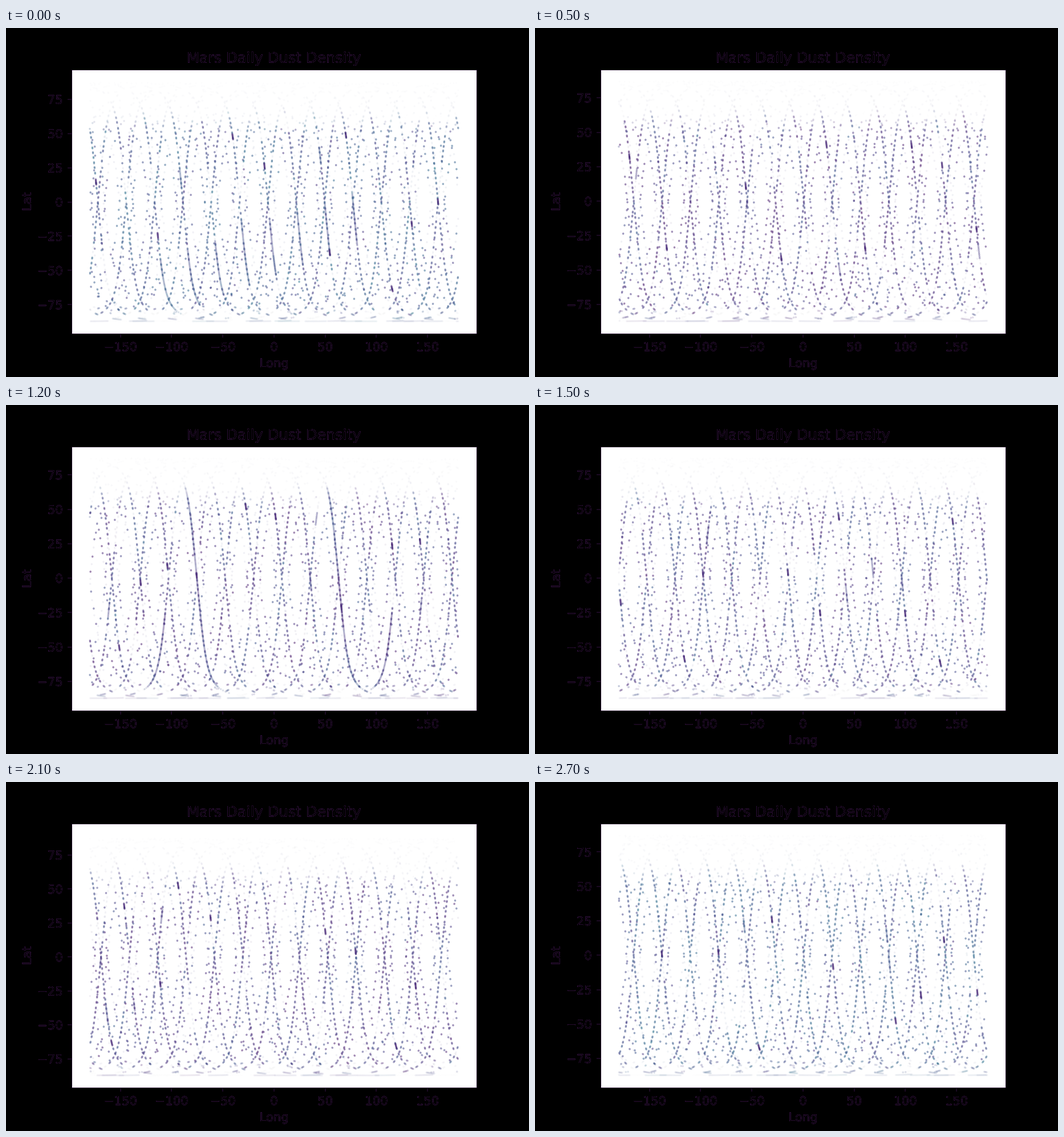
Write a matplotlib script that moves like this. It is 917 px wide and 611 px high and loops after 2800 ms.

```python
import numpy as np
import matplotlib.pyplot as plt
import matplotlib.patheffects as pe
from matplotlib.animation import FuncAnimation

W, H, DPI = 917, 611, 128
PT = 152.8 / DPI          # layout is a 6 x 4 inch figure at about 152.8 dpi
FRAMES, INTERVAL = 28, 100
ORBITS = 13
STEP = 360 / ORBITS
TILT = np.radians(92.8)


def first_crossing(day):
    """Longitude where the first northbound pass of the day meets the equator."""
    return np.interp(day, [0, 9, 12, 21, 27], [-172.1, -60.3, -20, 80.2, 166.8])


def top_limit(day):
    return np.interp(day, [0, 5, 17, 21, 27], [96.5, 95.3, 95.3, 97.9, 95.4])


def track(u, start, side=0):
    """Ground position at orbit angle u, looking `side` degrees off track."""
    a, d = np.radians(u), np.radians(side)
    x = np.cos(a) * np.cos(d)
    y = np.sin(a) * np.cos(TILT) * np.cos(d) - np.sin(TILT) * np.sin(d)
    z = np.sin(a) * np.sin(TILT) * np.cos(d) + np.cos(TILT) * np.sin(d)
    lon = np.degrees(np.arctan2(y, x)) + start - u / ORBITS
    return (lon + 180) % 360 - 180, np.degrees(np.arcsin(np.clip(z, -1, 1)))


def fade(lat, edge):
    north = .03 + .97 / (1 + np.exp((lat - edge) / 2.5))
    return north * np.where(lat < -79, .5, 1)


def long_passes(day):
    """Days with continuous sounding, as (orbit, lowest and highest angle)."""
    if day == 0:
        for k in range(2, 10):
            mid = -60 + 7.2 * (k - 2)
            yield k, max(mid - 22, -84), mid + 18
    elif day == 12:
        for k in (-2, 3):
            yield k, -84, 68
            yield k + 1, 205, 262


def day_dots(day):
    rng = np.random.default_rng(400 + day)
    tint = .21 + .05 * np.cos(.706 * day)
    starts = first_crossing(day) + STEP * np.arange(ORBITS)
    orbit = np.arange(ORBITS)[:, None]
    parts = []

    def add(u, start, alpha, value, side=0, edge=None):
        lon, lat = track(u, start, side)
        if edge is None:
            edge = np.where(np.cos(np.radians(u)) > 0, 62, 56)
        row = np.broadcast_arrays(lon, lat, alpha * fade(lat, edge), value)
        parts.append(np.array([r.ravel() for r in row]))

    def shade(u, k=0):
        wave = np.sin(np.radians(3 * u) + 2.1 * k + day)
        return tint + .06 * wave + rng.normal(0, .03, np.shape(u))

    def grid(low, high, step, jitter):
        base = np.arange(low, high, step)
        return base + rng.uniform(-jitter, jitter, (ORBITS, base.size))

    # regular soundings: small clusters along every track, with gaps
    u = grid(-90, 270, 3.7, .5)
    polar = np.abs(np.abs(u - 90) - 180) < 11
    keep = rng.random(u.shape) > np.where(polar, .4, .12)
    for leg in (0, 180):
        mid = leg + rng.uniform(-55, 60, (ORBITS, 1))
        half = rng.uniform(4, 18, (ORBITS, 1))
        hole = rng.random((ORBITS, 1)) < .5
        keep &= ~(hole & (np.abs(u - mid) < half))
    weight = np.where(keep, .32, .02)
    value = shade(u, orbit)
    for mask, count, alpha in ((~polar, 4, 1), (polar, 18, .42)):
        spread = np.linspace(-.5, .5, count)
        add(u[mask][:, None] + spread, starts[np.nonzero(mask)[0]][:, None],
            alpha * weight[mask][:, None], value[mask][:, None])

    # off-track soundings on both sides, scattered wider near the poles
    for sign in (-1, 1):
        u = grid(-86, 266, 5.8, .7)
        lat = np.degrees(np.arcsin(np.sin(np.radians(u))))
        busy = ((lat > 43) & (lat < 60)) | ((lat < -47) & (lat > -74))
        side = np.where(busy, rng.uniform(2.5, 9, u.shape),
                        rng.normal(6.3, .3, u.shape))
        seen = rng.random(u.shape) < np.where(busy, .8, .6)
        pair = u[..., None] + np.array([-.15, .15])
        add(pair, starts[:, None, None], np.where(seen, .38, .04)[..., None],
            shade(u, orbit)[..., None] - .02, sign * side[..., None], 55)

    # continuous passes: long ones on some days, a few medium ones on all
    for k, low, high in long_passes(day):
        u = np.arange(low, high, 1)
        add(u, starts[k], .4, shade(u))
    for _ in range(4):
        low = rng.uniform(-60, 30) + rng.choice([0, 0, 180])
        u = np.arange(low, low + rng.uniform(6, 14), 1.2)
        add(u, rng.choice(starts), .45, tint)

    # short dense stretches
    for k in rng.choice(ORBITS, 9, replace=False):
        u = rng.uniform(-68, 55) + np.linspace(-2, 2, 12)
        add(u, starts[k], .45, .11, edge=68)

    return np.concatenate(parts, axis=1)


plt.rcParams.update({"font.family": "DejaVu Sans", "font.size": 10 * PT})
fig = plt.figure(figsize=(W / DPI, H / DPI), dpi=DPI, facecolor="black")
ax = fig.add_axes([.125, .125, .775, .755])
ax.set_xlim(-198, 198)
ax.set_xticks(range(-150, 151, 50))
ax.set_yticks(range(-75, 76, 25))

# black lettering that shows only through its purple rim
RIM, LINE = (.8, .28, 1), "#210b2a"
ax.set_title("Mars Daily Dust Density", pad=6 * PT)
ax.set_xlabel("Long", labelpad=4 * PT)
ax.set_ylabel("Lat", labelpad=3.4 * PT)
ax.tick_params(length=3.5 * PT, width=.8 * PT, pad=3.5 * PT, color=LINE)
for spine in ax.spines.values():
    spine.set(color=LINE, linewidth=72 / DPI)
labels = [ax.title, ax.xaxis.label, ax.yaxis.label]
for text in labels + ax.get_xticklabels() + ax.get_yticklabels():
    text.set_color(RIM)
    text.set_path_effects([pe.Normal(), pe.PathPatchEffect(
        facecolor="black", edgecolor="none", linewidth=0)])

dots = ax.scatter([], [], s=1.8, linewidths=.5)


def update(day):
    lon, lat, alpha, value = day_dots(day)
    rgba = plt.cm.viridis(np.clip(value, .06, .5))
    rgba[:, 3] = alpha
    fill = rgba * [1, 1, 1, .3]
    dots.set_offsets(np.column_stack([lon, lat]))
    dots.set_edgecolors(rgba)
    dots.set_facecolors(fill)
    ax.set_ylim(-96, top_limit(day))
    return dots,


anim = FuncAnimation(fig, update, frames=FRAMES, interval=INTERVAL,
                     init_func=lambda: update(0), repeat=True,
                     repeat_delay=0, blit=False)
plt.show()
```
